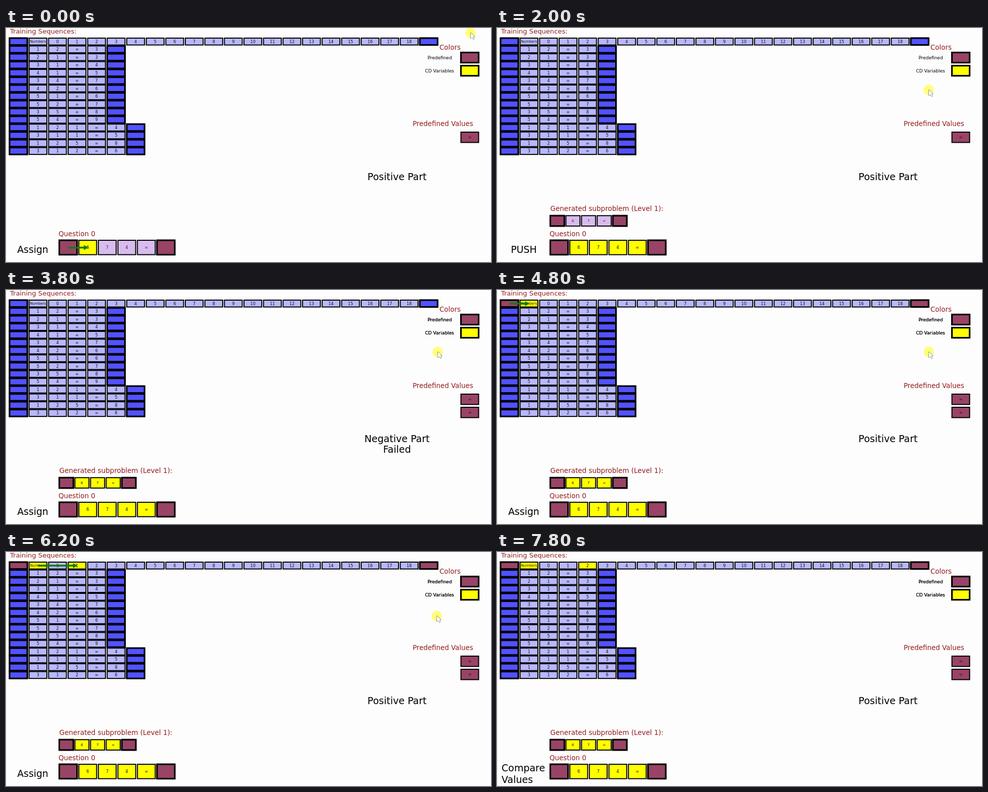
Animation of 960 by 463 pixels, one loop 8 s. Source, as an HTML page with a canvas:

```html
<!DOCTYPE html>
<html lang="en">
<head>
<meta charset="utf-8">
<title>Sequence matching</title>
<style>
  html, body { margin: 0; width: 100%; height: 100%; overflow: hidden; background: #fefdfe; }
  canvas { display: block; }
</style>
</head>
<body>
<canvas id="stage" width="960" height="463"></canvas>
<script>
const ctx = document.getElementById('stage').getContext('2d');
const LOOP = 8000, STEP = 200, PITCH = 38.67, ROW = 15.47;
const BLUE = '#5252ff', PALE = '#b8b8ff', MAROON = '#994466', YELLOW = '#ffff00',
      LILAC = '#d8bcf0', GREEN = '#00ff00', RED = '#ff0000', HEADING = '#921c1c';
const INK = { [RED]: '#8c0000', [GREEN]: '#064d06', [LILAC]: '#581028', [MAROON]: '#2a0a18' };

const header = ['Numbers', ...Array(19).keys()];
const rows = ['12=3', '21=3', '31=4', '41=5', '34=7', '42=6', '51=6', '52=7', '35=8', '54=9',
              '121=4', '311=5', '125=8', '312=6'];

function text(str, x, y, size, color = '#000', align = 'left') {
  ctx.font = `${size}px "DejaVu Sans", sans-serif`;
  ctx.fillStyle = color;
  ctx.textAlign = align;
  ctx.fillText(str, x, y);
}

function cell(x, y, w, h, fill, label = '', thick = false, size = 8) {
  ctx.fillStyle = fill;
  ctx.fillRect(x, y, w, h);
  ctx.strokeStyle = '#000';
  ctx.lineWidth = thick ? 3.2 : 2;
  ctx.strokeRect(x, y, w, h);
  if (label !== '') text(label, x + w / 2, y + h / 2 + size * 0.37, size, INK[fill] || '#111', 'center');
}

const columnX = i => 7 + PITCH * i;
const tableCell = (col, row, fill, label, thick) =>
  cell(columnX(col), 20 + ROW * row, 35.2, 13.6, fill, label, thick, label === 'Numbers' ? 7 : 8);

function line([x1, y1], [x2, y2], color, width) {
  ctx.strokeStyle = color;
  ctx.lineWidth = width;
  ctx.beginPath();
  ctx.moveTo(x1, y1);
  ctx.lineTo(x2, y2);
  ctx.stroke();
}

function arrow(x1, x2, y) {
  line([x1, y], [x2 - 6, y], '#0b7d12', 3.6);
  ctx.fillStyle = '#0b7d12';
  ctx.beginPath();
  ctx.moveTo(x2 + 1, y);
  ctx.lineTo(x2 - 8, y - 5);
  ctx.lineTo(x2 - 8, y + 5);
  ctx.fill();
}

// Boxed sequence with a maroon cell at each end
function sequence(labels, x, y, pitch, w, h, size, assigned, marked, color) {
  const last = labels.length + 1;
  for (let i = 0; i <= last; i++) {
    const end = i === 0 || i === last;
    const fill = end ? MAROON : i === marked ? color : i <= assigned ? YELLOW : LILAC;
    cell(x + i * pitch, y, w, h, fill, end ? '' : labels[i - 1], end, size);
  }
}

// What is shown at each 200 ms step
function stateAt(n) {
  const s = { label: 'Assign', part: ['Positive Part'], question: 4, sub: n < 8 ? -1 : 3,
              predefined: n < 16 ? 1 : 2, active: n >= 21, yellow: [], red: -1 };
  if (n < 4) {
    s.question = n + 1;
    s.questionArrow = n;
  } else if (n < 8) {
    s.label = 'Compare';
    s.match = n === 5 || n === 6;
  } else if (n < 13) {
    s.label = 'PUSH';
    s.sub = 0;
  } else if (n < 16) {
    s.sub = n - 12;
    s.subArrow = n - 13;
  } else if (n < 21) {
    if (n > 16) s.part = ['Negative Part'];
    if (n > 18) s.part.push('Failed');
  } else {
    const pair = n < 29 ? 2 : n < 36 ? 3 : 4;
    const compares = { 27: 1, 28: pair, 33: 0, 34: 1, 35: pair, 39: 0 };
    if (n in compares) {
      s.label = 'Compare';
      s.yellow = [1, pair];
      s.red = compares[n] || -1;
    } else {
      const second = [25, 26, 31, 32, 38].includes(n);
      const first = [23, 24, 29, 30, 37].includes(n);
      if (second) { s.yellow = [1, pair]; s.headArrow = [1, pair]; }
      else if (first) { s.yellow = [1]; s.headArrow = [0, 1]; }
    }
  }
  return s;
}

function drawTable(s) {
  tableCell(0, 0, s.active ? MAROON : BLUE, '', true);
  header.forEach((label, i) => {
    const col = i + 1;
    tableCell(col, 0, col === s.red ? RED : s.yellow.includes(col) ? YELLOW : PALE, label);
  });
  tableCell(21, 0, s.active ? MAROON : BLUE, '', true);
  rows.forEach((row, r) => {
    [...row].forEach((label, i) => tableCell(i + 1, r + 1, PALE, label));
    tableCell(0, r + 1, BLUE, '', true);
    tableCell(row.length + 1, r + 1, BLUE, '', true);
  });
}

function drawSide(s) {
  text('Colors', 858, 43, 13.4, HEADING);
  for (let i = 0; i < s.predefined; i++) {
    text('Predefined', 858.5, 62, 9, '#000', 'center');
    text('CD Variables', 858, 88, 9, '#000', 'center');
    cell(900.5, 206 + i * 26, 35, 20.5, s.match ? GREEN : MAROON, '=');
  }
  cell(900.5, 48.5, 35, 20, MAROON, '', true);
  cell(900.5, 74.5, 35, 20, YELLOW, '', true);
  text('Predefined Values', 805, 194, 13.4, HEADING);
  s.part.forEach((str, i) => text(str, 774, 301 + i * 21, 19, '#000', 'center'));
}

function drawCursor(n) {
  if (n >= 32) return;
  const stops = [[0, 920, 9], [5, 863, 116], [8, 855, 122], [25, 855, 122], [27, 853, 126], [32, 853, 126]];
  const k = stops.findIndex(stop => stop[0] > n);
  const [n0, x0, y0] = stops[k - 1], [n1, x1, y1] = stops[k];
  const u = (n - n0) / (n1 - n0), e = u * u * (3 - 2 * u);
  const x = x0 + (x1 - x0) * e, y = y0 + (y1 - y0) * e;
  ctx.fillStyle = 'rgba(255, 255, 70, 0.7)';
  ctx.beginPath();
  ctx.arc(x - 0.5, y + 0.5, 10.5, 0, Math.PI * 2);
  ctx.fill();
  ctx.save();
  ctx.translate(x, y);
  ctx.fillStyle = '#fff';
  ctx.strokeStyle = '#333';
  ctx.lineWidth = 1;
  ctx.stroke(new Path2D('M0 0V12L3 9.5L5 13.5L7 12.5L5 8.5H8Z'));
  ctx.fill(new Path2D('M0 0V12L3 9.5L5 13.5L7 12.5L5 8.5H8Z'));
  ctx.restore();
}

function draw(n) {
  const s = stateAt(n);
  ctx.fillStyle = '#fefdfe';
  ctx.fillRect(0, 0, 960, 463);
  ctx.fillStyle = '#ececf4';
  ctx.fillRect(0, 0, 1, 463);

  text('Training Sequences:', 8, 11, 13.1, HEADING);
  drawTable(s);
  drawSide(s);

  text('Question 0', 104, 412, 13.4, HEADING);
  sequence('674=', 105.5, 420, PITCH, 35.2, 28.5, 8, s.question, s.match ? 4 : -1, GREEN);
  if (s.sub >= 0) {
    text('Generated subproblem (Level 1):', 105.5, 362, 13.5, HEADING);
    sequence('67=', 105.5, 371.3, 30.93, 27.8, 20.6, 7, s.sub, s.red > 0 ? 2 : -1, RED);
  }

  if (s.label === 'Compare') {
    text('Compare', 9, 434, 19);
    text('Values', 9, 456.5, 19);
  } else {
    text(s.label, 53, 445, 18.8, '#000', 'center');
  }

  if (s.match) line([260.5, 420], [900, 206], '#000', 3);
  if (s.red > 0) line([columnX(s.red), 20], [167.5, 371], '#000', 3);
  if (s.questionArrow >= 0) arrow(123 + s.questionArrow * PITCH, 162 + s.questionArrow * PITCH, 434.5);
  if (s.subArrow >= 0) arrow(119.5 + s.subArrow * 30.93, 150.5 + s.subArrow * 30.93, 381.5);
  if (s.headArrow) arrow(columnX(s.headArrow[0]) + 17.6, columnX(s.headArrow[1]) + 17.6, 27);
  drawCursor(n);
}

let start, shown = -1;
function frame(now) {
  start ??= now;
  const n = Math.floor(((now - start) % LOOP) / STEP);
  if (n !== shown) draw(shown = n);
  requestAnimationFrame(frame);
}
draw(0);
requestAnimationFrame(frame);
</script>
</body>
</html>
```
